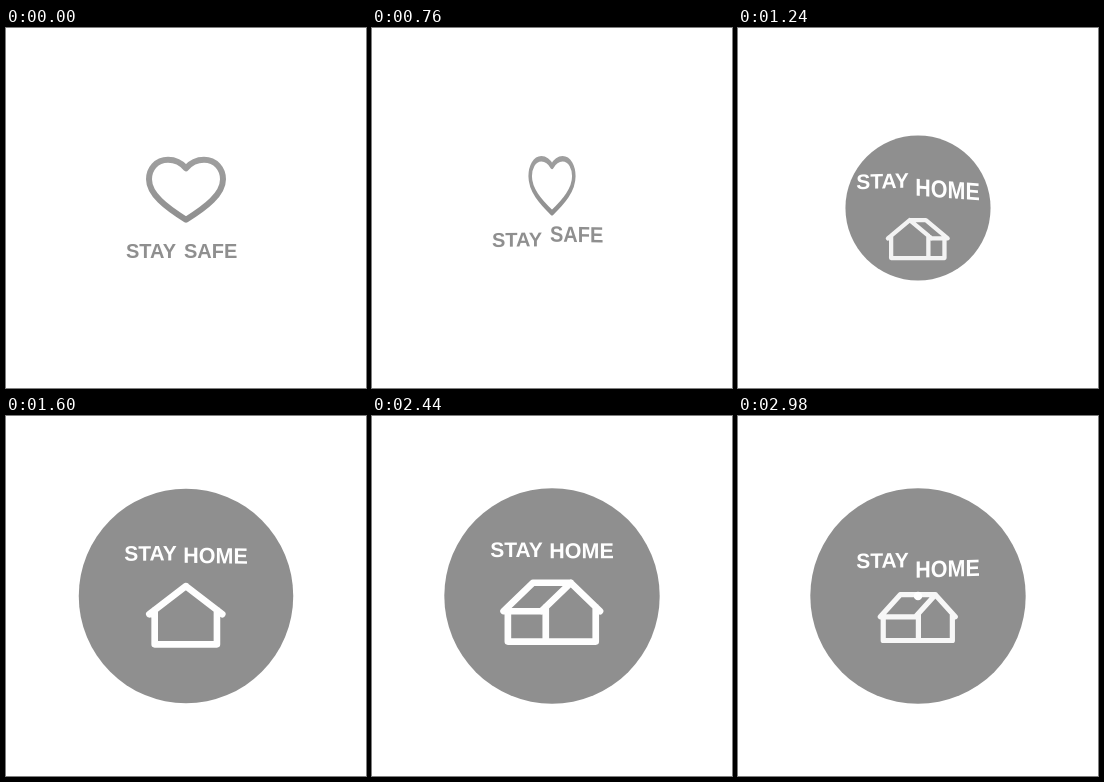
Recreate the animation shown at these times as an HTML page. Size 360 by 360 pixels, loop 3000 ms.

```html
<!DOCTYPE html>
<html lang="en">
<head>
<meta charset="utf-8">
<title>Stay safe, stay home</title>
<style>
  html, body { margin: 0; width: 100%; height: 100%; overflow: hidden; background: #fff; }
  svg { display: block; width: 100vw; height: 100vh; }
  text { font-family: "Liberation Sans", Arial, sans-serif; font-weight: 700; }
  .line { fill: none; stroke-linecap: round; stroke-linejoin: round; }
</style>
</head>
<body>
<svg viewBox="0 0 360 360">
  <defs>
    <linearGradient id="shade" x1="0" y1="0" x2="0" y2="1">
      <stop offset="0" stop-color="#9e9e9e"/>
      <stop offset="1" stop-color="#909090"/>
    </linearGradient>
    <clipPath id="reveal"><circle id="hole" cx="180" cy="180"/></clipPath>
  </defs>
  <g fill="#8f8f8f" font-size="20">
    <path id="heart" class="line" stroke="url(#shade)" stroke-width="6"
      d="M0-21C-6-28-13-29.5-18-29.5C-30-29.5-37-20-37-10C-37 5-20 18 0 30.5C20 18 37 5 37-10C37-20 30-29.5 18-29.5C13-29.5 6-28 0-21Z"/>
    <text id="stayA">STAY</text>
    <text id="safe">SAFE</text>
  </g>
  <circle id="disc" cx="180" cy="180" fill="#8f8f8f"/>
  <g clip-path="url(#reveal)" fill="#fff">
    <text id="stayB" font-size="21">STAY</text>
    <text id="home" font-size="21.5">HOME</text>
    <path id="house" class="line" stroke="#fff" stroke-width="6.8"/>
  </g>
  <circle id="dot" cx="180" cy="180" fill="#fff"/>
</svg>
<script>
const LOOP = 3000, SWAP = 1000;
const el = id => document.getElementById(id);
const clamp01 = v => Math.min(1, Math.max(0, v));

// 0 at rest, speeding up to 1 one second after start
const leave = (t, start) => clamp01((t - start) / 1000) ** 3.4;
// 1 at the swap, fading towards 0
const arrive = t => Math.exp(-Math.max(0, t - SWAP) / 240);

function placeWord(id, x, y, skew, tall = 1) {
  el(id).setAttribute("transform", `translate(${x} ${y}) skewY(${skew}) scale(1 ${tall})`);
}

function growDisc(t, start) {
  return 107.7 * (1 - (1 - clamp01((t - start) / 690)) ** 2.3);
}

function drawSafe(t) {
  const out = leave(t, 0);
  placeWord("stayA", 120, 230 - 28 * out, -2 * out);
  placeWord("safe", 178, 230 - 41.7 * out, 7.5 * out ** 2, 1 + .25 * out);

  const turn = Math.PI / 2 * clamp01(t / 990) ** 2.3;
  const size = 1 - .25 * out;
  el("heart").setAttribute("transform",
    `translate(180 ${161.3 - 10 * out}) scale(${size * Math.cos(turn)} ${size})`);
  el("heart").style.display = t < 985 ? "" : "none";
}

// Square-plan house turned about its vertical axis, eaves at y = 0
function housePath(degrees) {
  const a = degrees * Math.PI / 180, side = a < 0 ? 1 : -1;
  const half = 32, eave = 37.5, ridge = -29, floor = 31;
  const front = half * Math.sin(a), back = -front;
  const wall = half * Math.cos(a), roof = eave * Math.cos(a);
  const wallTop = ridge * (1 - half / eave);
  const near = front + side * wall, far = back + side * wall;
  return `M${front - roof} 0L${front} ${ridge}L${front + roof} 0`
    + `M${front - wall} ${wallTop}V${floor}H${front + wall}V${wallTop}`
    + `M${front} ${ridge}H${back}L${back + side * roof} 0H${near}`
    + `M${far} 0V${floor}H${near}`;
}

function drawHome(t) {
  const into = arrive(t), out = leave(t, 2000);
  placeWord("stayB", 118.3, 140 + 58 * into + 13 * out, -5 * into - out);
  placeWord("home", 177.3, 140.7 + 73 * into + 22.5 * out, 12 * into - 2 * out,
    1 + .38 * into + .1 * out);

  const size = 1 / (1 + 4.3 * into ** 2 + .33 * out);
  const angle = 46 * (1 - ((LOOP - t) / 1400) ** 1.8);
  const house = el("house");
  house.setAttribute("d", housePath(angle));
  house.setAttribute("transform",
    `translate(179.8 ${194.7 + 43 * into + 6.5 * out}) scale(${size})`);
  house.setAttribute("stroke-opacity", .7 + .3 * size);
}

function draw(t) {
  drawSafe(t);
  drawHome(t);
  const radius = growDisc(t, 975);
  el("disc").setAttribute("r", radius);
  el("hole").setAttribute("r", radius);
  el("dot").setAttribute("r", growDisc(t, 2969));
}

const begin = performance.now();
function tick() {
  draw((performance.now() - begin) % LOOP);
  requestAnimationFrame(tick);
}
tick();
</script>
</body>
</html>
```
